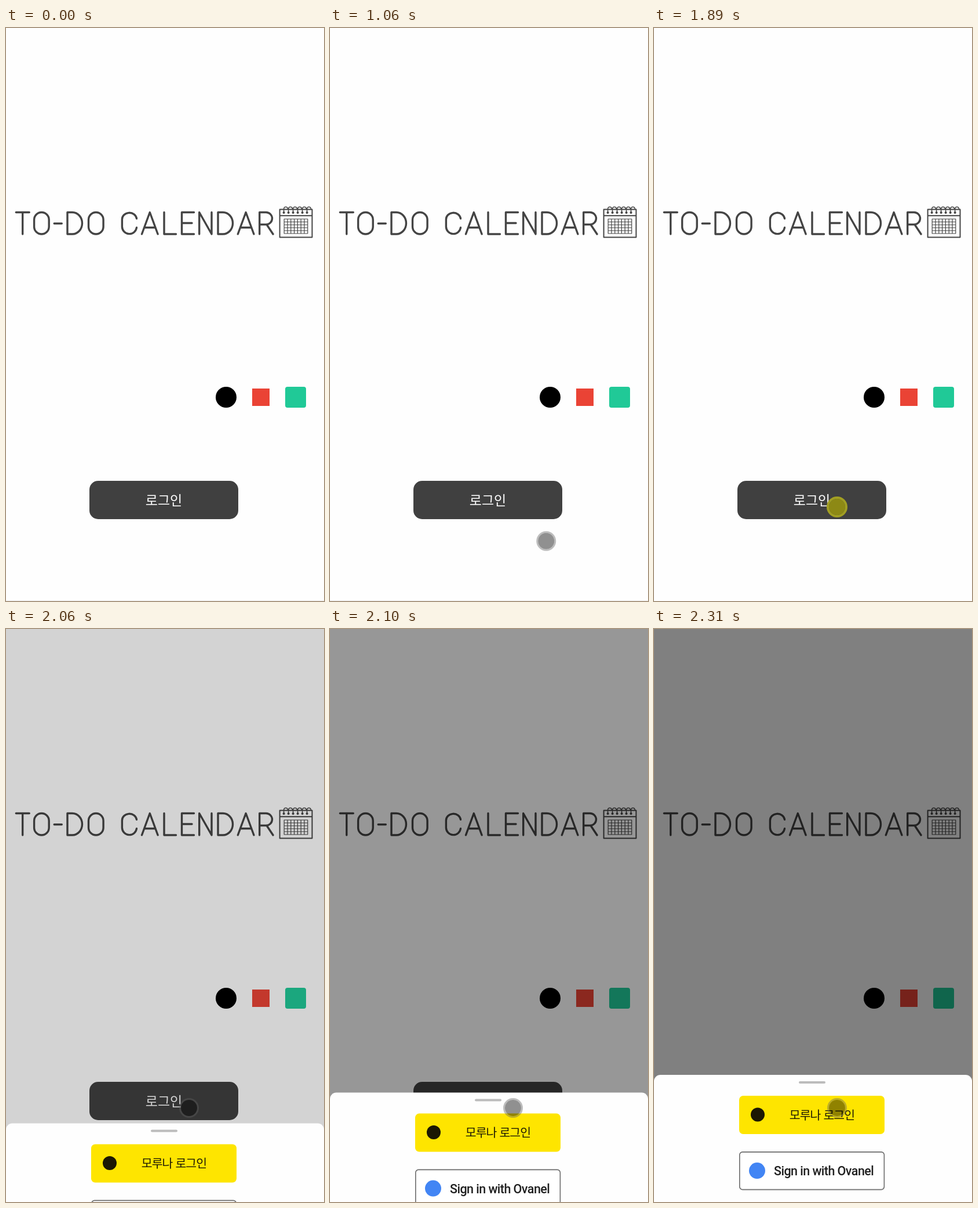
Write an HTML page that moves like this. It is 549 px wide and 987 px high and loops after 4030 ms.

```html
<!DOCTYPE html>
<html lang="ko">
<head>
<meta charset="utf-8">
<title>To-do calendar login</title>
<style>
  html, body { margin: 0; width: 100%; height: 100%; overflow: hidden; background: #fefefe; }
  svg { display: block; width: 100%; height: 100%; }
  .ko { font-family: "Noto Sans CJK KR", "Noto Sans CJK", sans-serif; text-anchor: middle; }
  .en { font-family: Roboto, sans-serif; font-weight: 500; letter-spacing: -0.55px; }
  .ink { fill: none; stroke: #444; stroke-linecap: round; stroke-linejoin: round; }
</style>
</head>
<body>
<svg viewBox="0 0 549 987">
  <rect width="549" height="987" fill="#fefefe"/>
  <path id="title" class="ink" stroke-width="3.4" role="img" aria-label="TO-DO CALENDAR"/>
  <g class="ink">
    <path d="M472.6 312.6H528.5V360.5H472.6ZM472.6 323.3H528.5" stroke-width="2"/>
    <path id="grid" stroke-width="1.2"/>
    <path id="rings" stroke-width="1.5"/>
    <path id="holes" stroke-width="4"/>
  </g>

  <circle cx="380" cy="636" r="18"/>
  <rect x="425" y="621" width="30" height="30" fill="#ea4335"/>
  <rect x="482" y="618" width="36" height="36" rx="4" fill="#20c997"/>

  <rect x="144" y="780" width="257" height="66" rx="15" fill="#404040"/>
  <text class="ko" x="272.5" y="821.5" font-size="23" fill="#fff">로그인</text>
  <rect id="edge" y="986" width="549" height="1" fill="#ececec"/>

  <rect id="shade" width="549" height="987"/>
  <g id="sheet">
    <rect width="549" height="260" rx="11" fill="#fefefe"/>
    <rect x="250" y="11" width="46" height="4" rx="2" fill="#bcbcbc"/>
    <rect x="147" y="36" width="251" height="66" rx="7" fill="#fee500"/>
    <circle cx="179" cy="68.5" r="12" fill="#1c1803"/>
    <text class="ko" x="290" y="76.5" font-size="20.5" letter-spacing="-0.9" fill="#1f1b04">모루나 로그인</text>
    <rect x="147.5" y="134" width="250.5" height="65.5" rx="6" fill="#000" opacity=".12"/>
    <rect x="147.8" y="132.8" width="249.6" height="64.6" rx="5" fill="#fff" stroke="#6a6a6a" stroke-width="1.6"/>
    <circle cx="178" cy="165" r="14" fill="#4285f4"/>
    <text class="en" x="207" y="173" font-size="21.5" fill="#1f1f1f">Sign in with Ovanel</text>
  </g>

  <g id="touch">
    <circle id="dot" r="14"/>
    <circle id="ring" fill="none"/>
  </g>
</svg>
<script>
const $ = id => document.getElementById(id);
const LOOP = 4030, ENTER = 780, REST = 1370, PRESS = 1890, OPEN = 2000;
const SHEET_Y = 768, SHEET_H = 219;

// Title lettering, one stroke path per capital
const O = x => `M${x} 330.3a12.8 12.8 0 0 1 25.6 0v11.9a12.8 12.8 0 0 1-25.6 0Z`;
const D = x => `M${x} 317.5v37.5h8.5a17 18.75 0 0 0 0-37.5Z`;
const A = x => `M${x} 355l13.8-37.5L${x + 27.6} 355m-4.2-11.3h-19.2`;
$('title').setAttribute('d', [
  'M17.3 317.5H40.2M28.7 317.5V355', O(48.6), 'M83.2 336.7H96.3', D(106), O(142.5),
  'M225.5 328.3A12.6 11.4 0 0 0 200.4 330V342.4A12.6 12.6 0 0 0 225.5 343.6',
  A(234.5), 'M273 317.5V355H293.5', 'M324.5 317.5H303.5V355H324.5M303.5 336H321',
  'M333.7 355V317.5L355 355V317.5', D(366), A(400.3),
  'M437.7 355V317.5H449A10.5 10.5 0 0 1 449 338.5H437.7M450 338.5L461 355'
].join(''));

// Calendar icon
const repeat = (n, f) => Array.from({ length: n }, (_, i) => f(i)).join('');
$('grid').setAttribute('d',
  repeat(8, i => `M${480.2 + i * 5.8} 329v25`) + repeat(6, i => `M480.2 ${329 + i * 5}h40.6`));
$('rings').setAttribute('d',
  repeat(6, i => `M${479.6 + i * 8} 318v-6c0-5 6.5-5 7 0`));
$('holes').setAttribute('d', repeat(6, i => `M${479.6 + i * 8} 318h.1`));

// Critically damped spring: share of the way still to go
const rest = (t, w) => t <= 0 ? 1 : (1 + w * t) * Math.exp(-w * t);

function draw(t) {
  $('edge').style.display = t < PRESS ? '' : 'none';
  $('shade').setAttribute('opacity', 0.5 * (1 - rest(t - 2036, 0.048)));
  const y = SHEET_Y + SHEET_H * rest(t - OPEN, 0.0343);
  $('sheet').setAttribute('transform', `translate(0 ${y})`);

  const p = Math.min(1, Math.max(0, (t - ENTER) / (REST - ENTER)));
  const left = Math.pow(1 - p, 1.5);
  const down = t >= PRESS && t < OPEN;
  $('touch').style.display = t < ENTER ? 'none' : '';
  $('touch').setAttribute('transform', `translate(${316 + 151 * left} ${825 + 155 * left})`);
  $('dot').setAttribute('fill', down ? '#8d8915' : 'rgba(0,0,0,.43)');
  $('ring').setAttribute('stroke', down ? '#a29f22' : 'rgba(95,95,95,.41)');
  $('ring').setAttribute('r', down ? 16 : 15.5);
  $('ring').setAttribute('stroke-width', down ? 4 : 3);
}

const start = performance.now();
function tick() {
  draw((performance.now() - start) % LOOP);
  requestAnimationFrame(tick);
}
tick();
</script>
</body>
</html>
```
